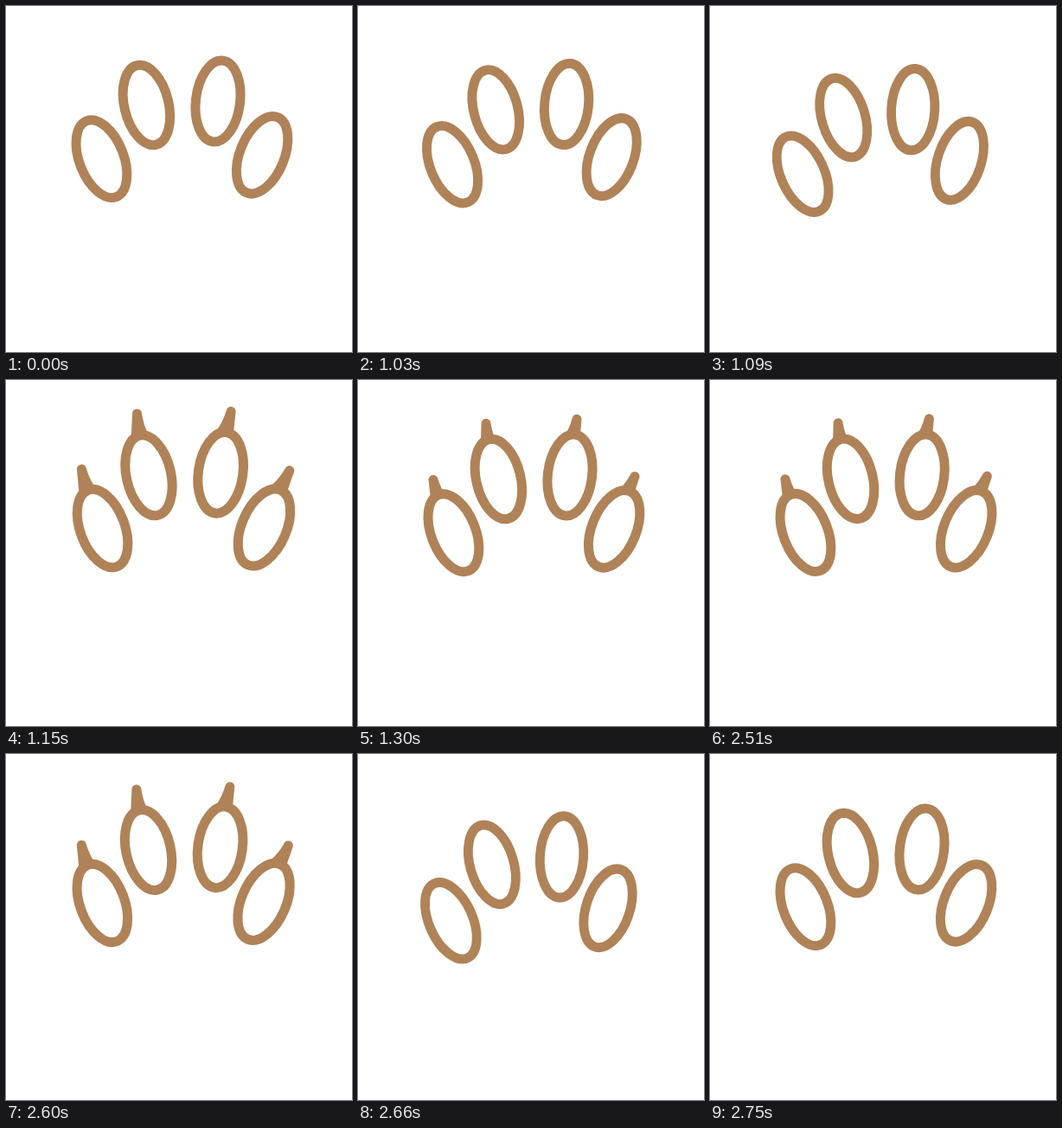
An HTML page with a canvas for the animation above (2.78 s loop, 400 by 400 pixels).

```html
<!DOCTYPE html>
<html lang="en">
<head>
<meta charset="utf-8">
<title>Paw</title>
<style>
  html, body { margin: 0; width: 100%; height: 100%; overflow: hidden; background: #fff; }
  canvas { display: block; width: 100vw; height: 100vh; }
</style>
</head>
<body>
<canvas id="stage" width="400" height="400"></canvas>
<script>
const ctx = document.getElementById('stage').getContext('2d');
const LOOP = 2780, STEP = 30;
const BROWN = '#b08257';
const PIVOT = { x: 400, y: 260 };
const RAD = Math.PI / 180;

// tip: centre of the claw's rounded end; lean: claw angle; slide: direction it comes out
const toes = [
  { x: 110.4, y: 176.7, tilt: -21.4, tip: [87, 115.3], lean: -13, slide: -15, side: 1 },
  { x: 162.4, y: 114.5, tilt: -13.5, tip: [148, 50.3], lean: -5, slide: -2, side: 1 },
  { x: 245, y: 110, tilt: 7, tip: [253, 45.3], lean: 11.5, slide: 22, side: -1 },
  { x: 296.1, y: 172.3, tilt: 22.4, tip: [320, 111.5], lean: 25, slide: 36, side: -1 }
];

const REST = { turn: 0, claw: null };
const BACK = -3.45, FORWARD = 1.18;  // swing of the paw in degrees
const HIDDEN = -30, REACH = 8;       // claw travel in pixels, 0 when settled
const SPREAD = 0.006, MIDDLE = 170;  // the toes spread sideways as the paw swings forward

// Swing back, strike with claws out, settle. p runs from 0 to 300.
function strike(p) {
  if (p <= 0) return REST;
  if (p <= 82) return { turn: BACK * Math.sin(Math.PI / 2 * p / 82), claw: null };
  if (p <= 132) {
    const e = (1 - Math.cos(Math.PI * (p - 82) / 50)) / 2;
    return { turn: BACK + (FORWARD - BACK) * e, claw: HIDDEN + (REACH - HIDDEN) * e };
  }
  const c = Math.pow(1 - Math.min(1, (p - 132) / 168), 3);
  return { turn: FORWARD * c, claw: REACH * c };
}

function poseAt(t) {
  const steps = from => STEP * Math.floor((t - from) / STEP);
  if (t < 1030) return REST;
  if (t < 1300) return strike(20 + steps(1030));
  if (t < 2450) return strike(300);
  return strike(300 - steps(2450));
}

function drawClaw(toe, out) {
  const a = toe.slide * RAD;
  ctx.save();
  ctx.translate(toe.tip[0] + out * Math.sin(a), toe.tip[1] - out * Math.cos(a));
  ctx.rotate(toe.lean * RAD);
  ctx.scale(toe.side, 1);
  ctx.beginPath();
  ctx.arc(0, 0, 5.5, Math.PI, 0);
  ctx.quadraticCurveTo(6.2, 12, 10.5, 23);
  ctx.lineTo(10, 30);
  ctx.lineTo(-9, 30);
  ctx.closePath();
  ctx.fillStyle = BROWN;
  ctx.fill();
  ctx.restore();
}

function drawToe(toe) {
  ctx.beginPath();
  ctx.ellipse(toe.x, toe.y, 25.6, 47.2, toe.tilt * RAD, 0, 2 * Math.PI);
  ctx.fillStyle = '#fff';
  ctx.fill();
  ctx.strokeStyle = BROWN;
  ctx.lineWidth = 11;
  ctx.stroke();
}

function draw(t) {
  const pose = poseAt(t);
  ctx.fillStyle = '#fff';
  ctx.fillRect(0, 0, 400, 400);
  ctx.save();
  ctx.translate(PIVOT.x, PIVOT.y);
  ctx.rotate(pose.turn * RAD);
  ctx.translate(MIDDLE - PIVOT.x, 0);
  ctx.scale(1 + SPREAD * pose.turn, 1);
  ctx.translate(-MIDDLE, -PIVOT.y);
  for (const toe of toes) {
    if (pose.claw !== null) drawClaw(toe, pose.claw);
    drawToe(toe);
  }
  ctx.restore();
}

const start = performance.now();
function frame() {
  draw((performance.now() - start) % LOOP);
  requestAnimationFrame(frame);
}
frame();
</script>
</body>
</html>
```
